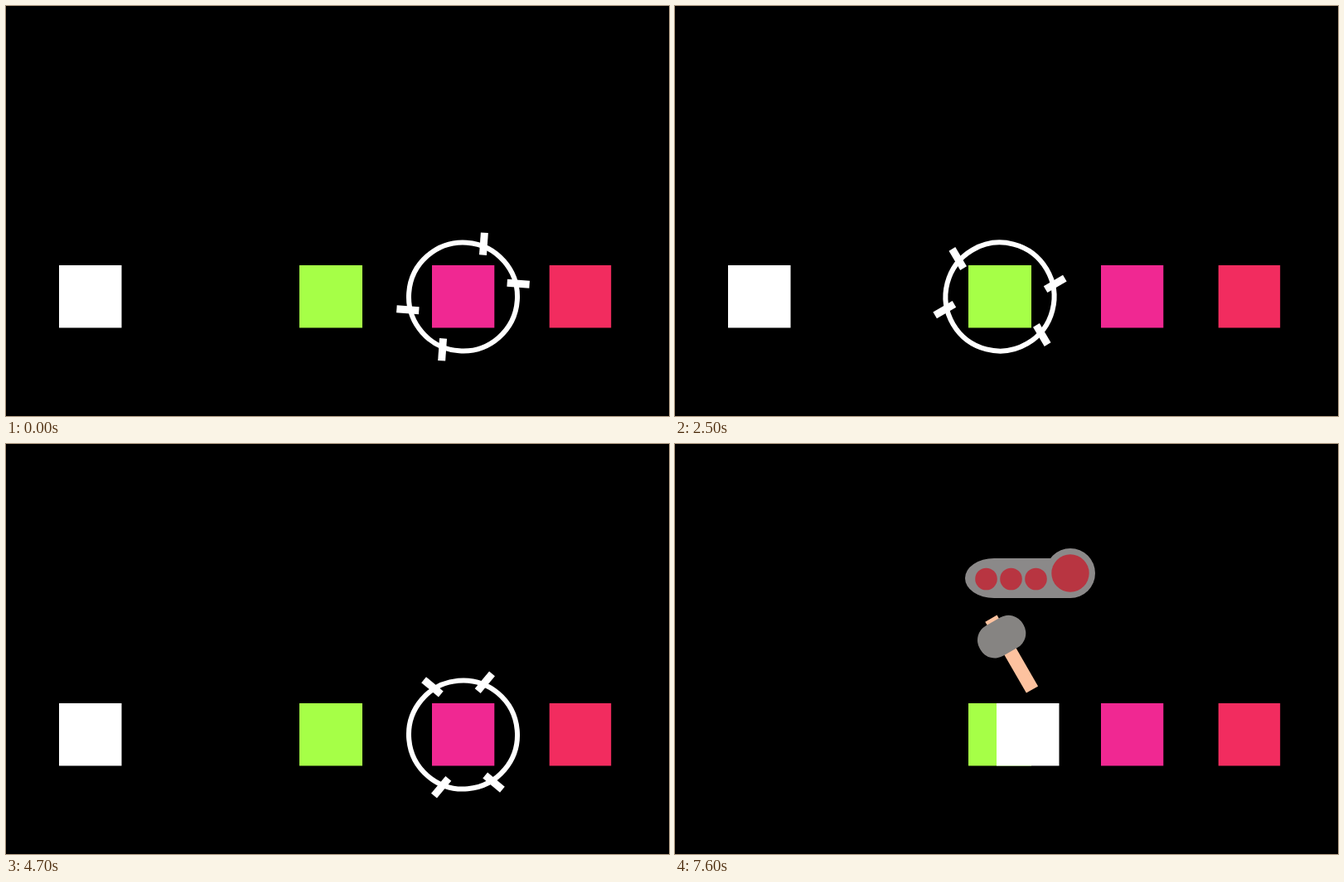
An HTML page that plays this animation: 800 by 495 pixels, repeating every 8 s.

```html
<!DOCTYPE html>
<html>
<head>
<meta charset="utf-8">
<style>
  html, body { margin: 0; width: 100%; height: 100%; overflow: hidden; background: #000; }
  svg { display: block; width: 800px; height: 495px; }
</style>
</head>
<body>
<svg viewBox="0 0 800 495">
  <rect x="354" y="313" width="76" height="75.5" fill="#a6ff47"/>
  <rect x="514" y="313" width="75.3" height="75.5" fill="#f02892"/>
  <rect x="655.7" y="313" width="74.5" height="75.5" fill="#f22c5f"/>
  <rect id="player" y="313" width="75.5" height="75.5" fill="#fff"/>

  <g id="reticle" fill="#fff">
    <circle r="65.5" fill="none" stroke="#fff" stroke-width="6"/>
    <rect x="51.9" y="-24.9" width="27" height="9"/>
    <rect x="-78.9" y="15.9" width="27" height="9"/>
    <rect x="15.9" y="-78.9" width="9" height="27"/>
    <rect x="-24.9" y="51.9" width="9" height="27"/>
  </g>

  <g id="tools">
    <g fill="#8b8989">
      <path d="M385 138H477V186H385A35 24 0 0 1 385 138Z"/>
      <circle cx="477" cy="156" r="30"/>
    </g>
    <g fill="#b83541">
      <circle cx="375.5" cy="163" r="13.3"/>
      <circle cx="405.5" cy="163" r="13.3"/>
      <circle cx="435.5" cy="163" r="13.3"/>
      <circle cx="477" cy="156" r="22.7"/>
    </g>
    <g id="hammer">
      <rect x="419" y="198.3" width="16.4" height="99.2" fill="#fdc29f"/>
      <rect x="397.2" y="202.8" width="60" height="42" rx="20" fill="#868482"/>
    </g>
  </g>
</svg>
<script>
const LOOP = 8000, STEP = 100;
const [player, reticle, tools, hammer] =
  ['player', 'reticle', 'tools', 'hammer'].map(id => document.getElementById(id));
const clamp = (v, lo, hi) => Math.min(hi, Math.max(lo, v));
const ramp = (t, from, to) => clamp((t - from) / (to - from), 0, 1);

// The reticle jumps between the squares
const targetX = t => t < 700 ? 551.5 : t < 1200 ? 692.5 : t < 3100 ? 392 : 551.5;

function draw(t) {
  player.setAttribute('x', clamp(64 + (t - 5187) * 0.231, 64, 388));
  reticle.setAttribute('transform', `translate(${targetX(t)} 351) rotate(${4 - t * 0.0498})`);
  reticle.style.display = t < 4900 ? '' : 'none';
  tools.style.opacity = ramp(t, 6600, 7000);
  hammer.setAttribute('transform', `rotate(${-30 * ramp(t, 7300, 7600)} 427.2 289.9)`);
}

const start = performance.now();
function tick() {
  const t = (performance.now() - start) % LOOP;
  draw(Math.floor(t / STEP) * STEP);
  requestAnimationFrame(tick);
}
tick();
</script>
</body>
</html>
```
